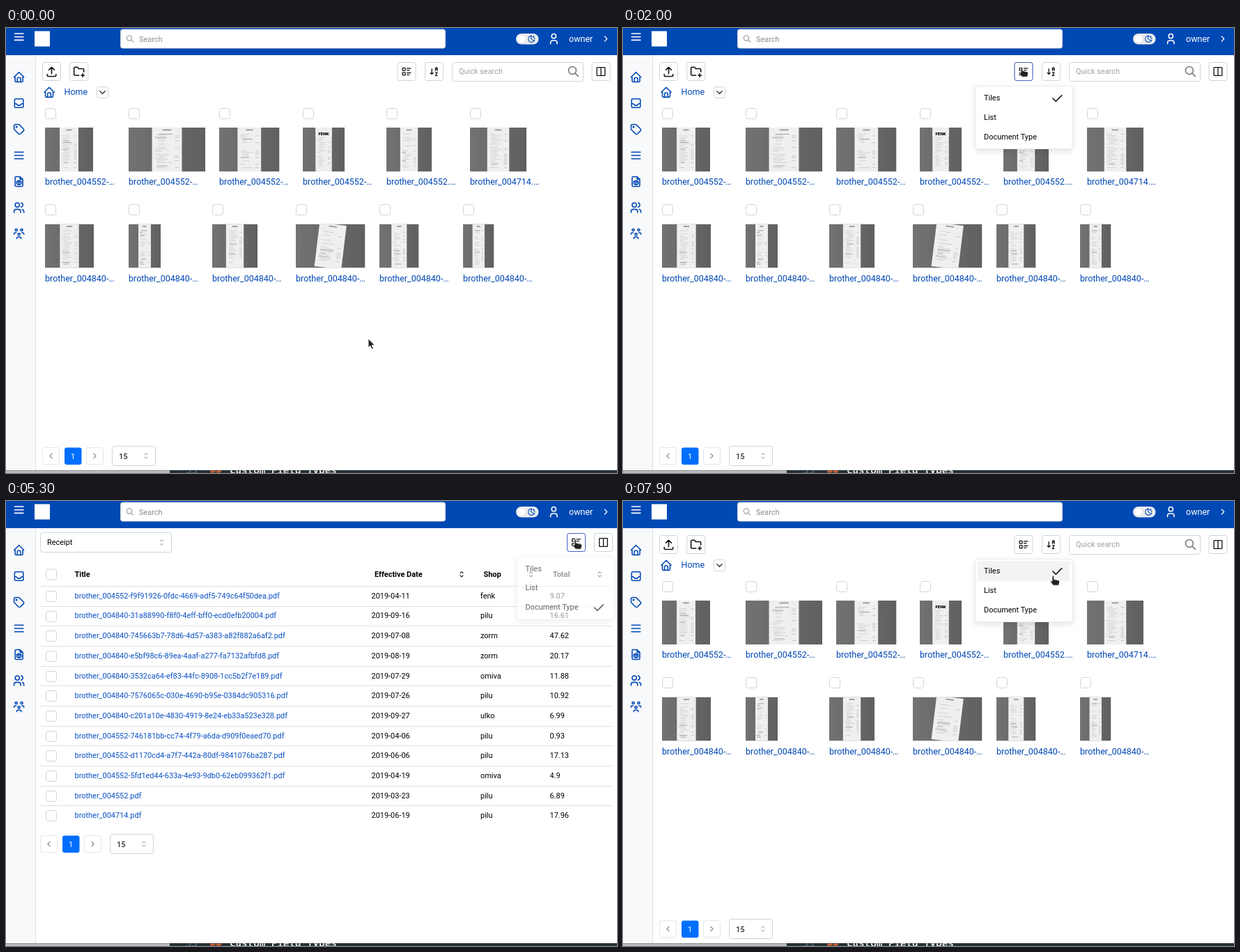
An HTML page that plays this animation: 877x639 px, repeating every 8 s.

```html
<!DOCTYPE html>
<html lang="en">
<head>
<meta charset="utf-8">
<title>Document browser</title>
<style>
html, body { margin: 0; width: 100%; height: 100%; overflow: hidden; background: #fff; }
svg { display: block; width: 877px; height: 639px; font: 10.95px Roboto, Arial, sans-serif; }
text { white-space: pre; }
.icon { fill: none; stroke-linecap: round; stroke-linejoin: round; }
.big { font-size: 12.5px; }
.bold { font-weight: 700; }
.mark { font-size: 6.2px; font-weight: 900; text-anchor: middle; }
.mono { font: bold 14.2px "DejaVu Sans Mono", monospace; }
#menu .panel { filter: drop-shadow(0 3px 5px rgba(0,0,0,.11)); }
</style>
</head>
<body>
<svg id="stage" viewBox="0 0 877 639" xmlns="http://www.w3.org/2000/svg"></svg>
<script>
const BLUE = '#0048b4', LINK = '#0a50c3', LINE = '#dee2e6', EDGE = '#ced4da', GRAY = '#868e96', INK = '#111';

const square = (x, y) => `M${x} ${y + 1}a1 1 0 0 1 1-1h4a1 1 0 0 1 1 1v4a1 1 0 0 1-1 1h-4a1 1 0 0 1-1-1z`;
const circle = (x, y, r) => `M${x - r} ${y}a${r} ${r} 0 1 0 ${2 * r} 0a${r} ${r} 0 1 0 ${-2 * r} 0`;
const ICONS = {
  home: 'M5 12H3l9-9 9 9h-2M5 12v7a2 2 0 0 0 2 2h10a2 2 0 0 0 2-2v-7M9 21v-6a2 2 0 0 1 2-2h2a2 2 0 0 1 2 2v6',
  inbox: 'M4 6a2 2 0 0 1 2-2h12a2 2 0 0 1 2 2v12a2 2 0 0 1-2 2H6a2 2 0 0 1-2-2zM4 13h3l3 3h4l3-3h3',
  tag: circle(7.5, 7.5, 1) + 'M3 6v5.2a2 2 0 0 0 .6 1.4l7.7 7.7a2.4 2.4 0 0 0 3.4 0l5.6-5.6a2.4 2.4 0 0 0 0-3.4l-7.7-7.7A2 2 0 0 0 11.2 3H6a3 3 0 0 0-3 3z',
  lines: 'M4 6h16M4 12h16M4 18h16',
  file: 'M14 3v4a1 1 0 0 0 1 1h4M17 21H7a2 2 0 0 1-2-2V5a2 2 0 0 1 2-2h7l5 5v11a2 2 0 0 1-2 2zM12 13.5l4-1.5M8 11.8l4 1.7V18l4-1.8v-4.4L12 10zV16l4 2',
  users: circle(9, 7, 4) + 'M3 21v-2a4 4 0 0 1 4-4h4a4 4 0 0 1 4 4v2M16 3.1a4 4 0 0 1 0 7.8M21 21v-2a4 4 0 0 0-3-3.9',
  group: circle(12, 13, 2) + circle(17, 5, 2) + circle(7, 5, 2) + 'M8 21v-1a2 2 0 0 1 2-2h4a2 2 0 0 1 2 2v1M17 10h2a2 2 0 0 1 2 2v1M3 13v-1a2 2 0 0 1 2-2h2',
  search: circle(10, 10, 7) + 'M21 21l-6-6',
  user: circle(12, 7, 4) + 'M6 21v-2a4 4 0 0 1 4-4h4a4 4 0 0 1 4 4v2',
  upload: 'M4 17v2a2 2 0 0 0 2 2h12a2 2 0 0 0 2-2v-2M7 9l5-5 5 5M12 4v12',
  folder: 'M12 19H5a2 2 0 0 1-2-2V6a2 2 0 0 1 2-2h4l3 3h7a2 2 0 0 1 2 2v3.5M16 19h6M19 16v6',
  details: 'M13 5h8M13 9h5M13 15h8M13 19h5' + square(3, 4) + square(3, 14),
  sort: 'M15 10V5c0-1.4.6-2 2-2s2 .6 2 2v5m0-3h-4M19 21h-4l4-7h-4M4 15l3 3 3-3M7 6v12',
  columns: 'M3 4a1 1 0 0 1 1-1h16a1 1 0 0 1 1 1v16a1 1 0 0 1-1 1H4a1 1 0 0 1-1-1zM12 3v18',
  selector: 'M8 9l4-4 4 4M16 15l-4 4-4-4',
  down: 'M6 9l6 6 6-6',
  left: 'M15 6l-6 6 6 6',
  right: 'M9 6l6 6-6 6',
  check: 'M5 12l5 5L20 7',
  moon: 'M12 3h.4a7.5 7.5 0 0 0 7.9 12.4A9 9 0 1 1 12 3zM17 4a2 2 0 0 0 2 2 2 2 0 0 0-2 2 2 2 0 0 0-2-2 2 2 0 0 0 2-2M19 11h2m-1-1v2'
};

const icon = (name, cx, cy, size = 18.8, color = INK, weight = 2) =>
  `<path class="icon" d="${ICONS[name]}" stroke="${color}" stroke-width="${weight}" transform="translate(${cx - size / 2} ${cy - size / 2}) scale(${size / 24})"/>`;
const rect = (x, y, w, h, fill, stroke = 'none', r = 0) =>
  `<rect x="${x}" y="${y}" width="${w}" height="${h}" rx="${r}" fill="${fill}" stroke="${stroke}"/>`;
const box = (x, y, w, h, stroke = EDGE) => rect(x + .5, y + .5, w - 1, h - 1, '#fff', stroke, 3);
const text = (s, x, y, fill = '#000', cls = '') => `<text x="${x}" y="${y}" fill="${fill}" class="${cls}">${s}</text>`;
const button = (name, cx, cy, size = 15.6) => box(cx - 13.5, cy - 13.5, 27, 27) + icon(name, cx, cy, size);
const checkbox = (x, y) => box(x, y, 16, 16);
const selector = (x, y) => icon('selector', x, y, 13, GRAY, 1.8);

function pager(x, y) {
  const step = (name, dx) => box(x + dx, y, 25, 25, '#e3e6ea') + icon(name, x + dx + 12.5, y + 12.5, 13, GRAY);
  return step('left', 0) + rect(x + 32, y + .4, 24.5, 24.5, '#006ffd', 'none', 3) + text('1', x + 41, y + 16.5, '#fff') +
    step('right', 63) + box(x + 100, y - 2, 63, 29) + text('15', x + 110, y + 16.8) + selector(x + 149, y + 12.5);
}

function chrome() {
  const side = ['home', 'inbox', 'tag', 'lines', 'file', 'users', 'group'];
  return rect(0, 0, 877, 39, BLUE) + rect(0, 39, 42, 596, '#f8f9fa') + rect(42, 39, 1, 596, LINE) +
    icon('lines', 18.7, 12.7, 18.8, '#fff') + rect(41, 4.5, 22, 22, '#fff') +
    box(164, 1.5, 467, 28) + icon('search', 178, 15.5, 12.5, GRAY) + text('Search', 191, 19.6, GRAY) +
    rect(732, 8, 32.5, 15.6, '#e9ecef', 'none', 7.8) + `<circle cx="740" cy="15.8" r="6" fill="#fff" stroke="${LINE}"/>` +
    icon('moon', 754.5, 15.6, 12.5, BLUE) + icon('user', 786.3, 15.6, 18.8, '#fff') +
    text('owner', 808, 19.8, '#fff', 'big') + icon('right', 861, 15.5, 14, '#fff') +
    side.map((n, i) => icon(n, 18.6, 70.5 + i * 37.5, 18.8, BLUE)).join('');
}

function backdrop() {
  return '<clipPath id="strip"><path d="M0 635h877v4H0z"/></clipPath><g clip-path="url(#strip)">' +
    rect(0, 635, 235, 4, '#b9bbbd') + rect(235, 635, 642, 4, '#263238') +
    text('33', 258, 639.5, '#546570', 'mono') + text('##', 293, 639.5, '#e0693a', 'mono') +
    text('Custom Field Types', 321, 639.5, '#e8ecee', 'mono') + rect(0, 635, 877, 1, 'rgba(0,0,0,.25)') + '</g>';
}

// Small seeded generator for the print on the receipts
let seed = 7;
const random = () => (seed = seed * 16807 % 2147483647) / 2147483647;

function receipt(w, mark) {
  let out = rect(0, 0, w, 63, '#efefef') + rect(w * .35, 2.5, w * .3, 1.8, '#999');
  for (let y = 9; y < 57; y += 2.4) {
    if (random() < .2) continue;
    const shade = random() < .15 ? '#999' : '#cfcfcf';
    out += rect(w * (.1 + random() * .12), y, w * (.2 + random() * .3), .9, shade);
    if (random() < .6) out += rect(w * .76, y, w * .14, .9, '#c4c4c4');
  }
  return out + (mark ? rect(0, 0, w, 13, '#efefef') + text(mark, w / 2, 11, '#000', 'mark') : '');
}

// label, width, tilt, printed heading
const TILES = [
  [['4552-', 69], ['4552-', 110], ['4552-', 86.5], ['4552-', 60, 0, 'FENK'], ['4552.', 65], ['4714.', 81]],
  [['4840-', 70], ['4840-', 46], ['4840-', 65], ['4840-', 99.5, 7], ['4840-', 56.5], ['4840-', 44.5]]
];

function tileRow(tiles, row) {
  const y = row ? 281.5 : 143;
  let left = 56;
  return tiles.map(([label, w, tilt = 0, mark], i) => {
    const x = left, paper = w * .39, id = `thumb${row}${i}`;
    left += Math.max(100, w) + 20;
    return checkbox(Math.round(x), Math.round(y - 28.2)) + `<clipPath id="${id}">${rect(x, y, w, 63)}</clipPath>` +
      `<g clip-path="url(#${id})">${rect(x, y, w, 63, 'url(#scan)')}` +
      `<g transform="translate(${x + w * .305} ${y}) rotate(${tilt} ${paper / 2} 31)">${receipt(paper, mark)}</g></g>` +
      text(`brother_00${label}…`, x, y + 82, BLUE, 'big');
  }).join('');
}

function tilesView() {
  return button('upload', 65.5, 62.5, 18.8) + button('folder', 104.7, 62.5, 18.8) + button('details', 575, 62.5) + button('sort', 614.5, 62.5) +
    box(640, 49, 189, 28) + text('Quick search', 650, 66.4, '#9aa1a8') + icon('search', 814.5, 62.5, 18.8, '#777') +
    button('columns', 854, 62.5) + icon('home', 62, 92.3, 18.8, BLUE) + text('Home', 83.5, 96.4, BLUE, 'big') +
    box(130, 84, 17, 17) + icon('down', 138.5, 92.5, 15) + TILES.map(tileRow).join('') + pager(52, 602);
}

const ROWS = `4552-f9f91926-0fdc-4669-adf5-749c64f50dea 04-11 fenk 9.07
4840-31a88990-f8f0-4eff-bff0-ecd0efb20004 09-16 pilu 16.61
4840-745663b7-78d6-4d57-a383-a82f882a6af2 07-08 zorm 47.62
4840-e5bf98c6-89ea-4aaf-a277-fa7132afbfd8 08-19 zorm 20.17
4840-3532ca64-ef83-44fc-8908-1cc5b2f7e189 07-29 omiva 11.88
4840-7576065c-030e-4690-b95e-0384dc905316 07-26 pilu 10.92
4840-c201a10e-4830-4919-8e24-eb33a523e328 09-27 ulko 6.99
4552-746181bb-cc74-4f79-a6da-d909f0eaed70 04-06 pilu 0.93
4552-d1170cd4-a7f7-442a-80df-9841076ba287 06-06 pilu 17.13
4552-5fd1ed44-633a-4e93-9db0-62eb099362f1 04-19 omiva 4.9
4552 03-23 pilu 6.89
4714 06-19 pilu 17.96`.split('\n').map(r => r.split(' '));

function tableView() {
  const heading = (s, x, sortX) => text(s, x, 108.8, '#000', 'bold') + (sortX ? icon('selector', sortX, 105.3, 12.5) : '');
  return box(49, 45, 189, 29) + text('Receipt', 59, 63.4) + selector(223.5, 59.5) +
    button('details', 818.5, 59.5) + button('columns', 857.5, 59.5) + checkbox(57, 97.5) +
    heading('Title', 98.5) + heading('Effective Date', 529, 654) + heading('Shop', 685.5, 753.5) + heading('Total', 785, 852) +
    ROWS.map(([name, date, shop, total], i) => {
      const y = 136 + i * 28.68, cell = (s, x, fill) => text(s, x, y + 3.8, fill);
      return rect(49, Math.round(y - 14), 822, 1, LINE) + checkbox(57, Math.round(y - 7)) +
        cell(`brother_00${name}.pdf`, 98.5, LINK) + cell(`2019-${date}`, 524.5) + cell(shop, 681) + cell(total, 780.5);
    }).join('') + pager(49, 480);
}

const ROW_H = 27.8;
const menu = () => `<g id="menu"><g class="panel">${rect(.5, .5, 139, 90, '#fff', '#e9ecef', 3)}</g>` +
  `<rect id="hover" x="3.5" width="132" height="28.5" rx="3" fill="#f1f3f5"/>` +
  ['Tiles', 'List', 'Document Type'].map((s, i) => text(s, 12.5, 21 + i * ROW_H)).join('') +
  `<g id="tick">${icon('check', 117.5, 18, 20.5)}</g></g>`;

const cursors = () => `<g id="cursor" fill="#222" stroke="#fff" stroke-width=".9" stroke-linejoin="round">
  <path id="arrow" d="M0 0V13.1L2.9 10.4 5.1 15.3 7.4 14.3 5.2 9.6H9.3z"/>
  <path id="hand" d="M-2 1.3Q-.6-.6.8 1.2V5.4L7 6.7Q9 7.2 8.6 9.5L7.5 14.2H-.5L-4.6 8.8Q-3.6 7-2 8.2z"/></g>`;

const stage = document.getElementById('stage');
stage.innerHTML = `<defs><linearGradient id="scan"><stop stop-color="#727272"/><stop offset="1" stop-color="#606060"/></linearGradient></defs>` +
  rect(0, 0, 877, 639, '#fff') + `<g id="tiles">${tilesView()}</g><g id="table">${tableView()}</g>` +
  chrome() + backdrop() + '<rect id="focus" width="26" height="26" rx="3" fill="none" stroke="#4c5fc4"/>' + menu() + cursors();

// Pointer strokes: start, end, curve; it rests in between
const curve = d => {
  const path = document.createElementNS('http://www.w3.org/2000/svg', 'path');
  path.setAttribute('d', d);
  return path;
};
const STROKES = [
  [200, 1000, 'M520 446C620 330 690 190 581 90'],
  [1000, 1200, 'M581 90Q577 78 573 56'],
  [2000, 2300, 'M573 56L571 154'],
  [3100, 4000, 'M571 154C705 260 545 465 462 340C435 290 500 235 528 202'],
  [4000, 4800, 'M528 202C600 320 760 300 812 10'],
  [4800, 4900, 'M812 10L818 55'],
  [5300, 6100, 'M818 55Q770 90 781 95'],
  [6100, 7000, 'M781 95C760 220 640 270 601 140Q600 70 638 73'],
  [7000, 7300, 'M638 73L574 56'],
  [7600, 7900, 'M574 56Q600 95 618 107']
].map(([start, end, d]) => ({ start, end, path: curve(d) }));

function pointer(t) {
  const { start, end, path } = STROKES.filter(s => s.start <= t).pop() || STROKES[0];
  const k = Math.min(1, Math.max(0, (t - start) / (end - start)));
  return path.getPointAtLength(k * path.getTotalLength());
}

const within = (t, spans) => spans.find(([a, b]) => t >= a && t < b);
const OPEN = [[1600, 2600], [5300, 6000], [7500, 8000]];
const FOCUS = [[1500, 2100], [5000, 5500], [7400, 7700]];
const POINTING = [[1200, 2600], [4900, 6000], [7300, 8000]];

const el = id => document.getElementById(id);
const show = (id, on) => el(id).setAttribute('display', on ? 'inline' : 'none');
const move = (id, x, y) => el(id).setAttribute('transform', `translate(${x} ${y})`);

function render(now) {
  const t = Math.floor(now % 8000 / 100) * 100;
  const table = t >= 2600 && t < 6000, open = within(t, OPEN), hand = within(t, POINTING);
  const { x, y } = pointer(t), top = table ? 79.5 : 83;
  const row = Math.floor((y - top - 3) / ROW_H);
  show('tiles', !table);
  show('table', table);
  show('menu', open);
  move('menu', table ? 733 : 505.5, top);
  el('menu').setAttribute('opacity', open && t === open[0] ? .6 : 1);
  move('tick', 0, table ? 2 * ROW_H : 0);
  show('hover', row >= 0 && row < 3);
  el('hover').setAttribute('y', 3.3 + row * ROW_H);
  show('focus', within(t, FOCUS));
  move('focus', table ? 805.5 : 562, table ? 46.5 : 49.5);
  show('arrow', !hand);
  show('hand', hand);
  move('cursor', x, y);
}

function loop() {
  render(performance.now());
  requestAnimationFrame(loop);
}
loop();
</script>
</body>
</html>
```
